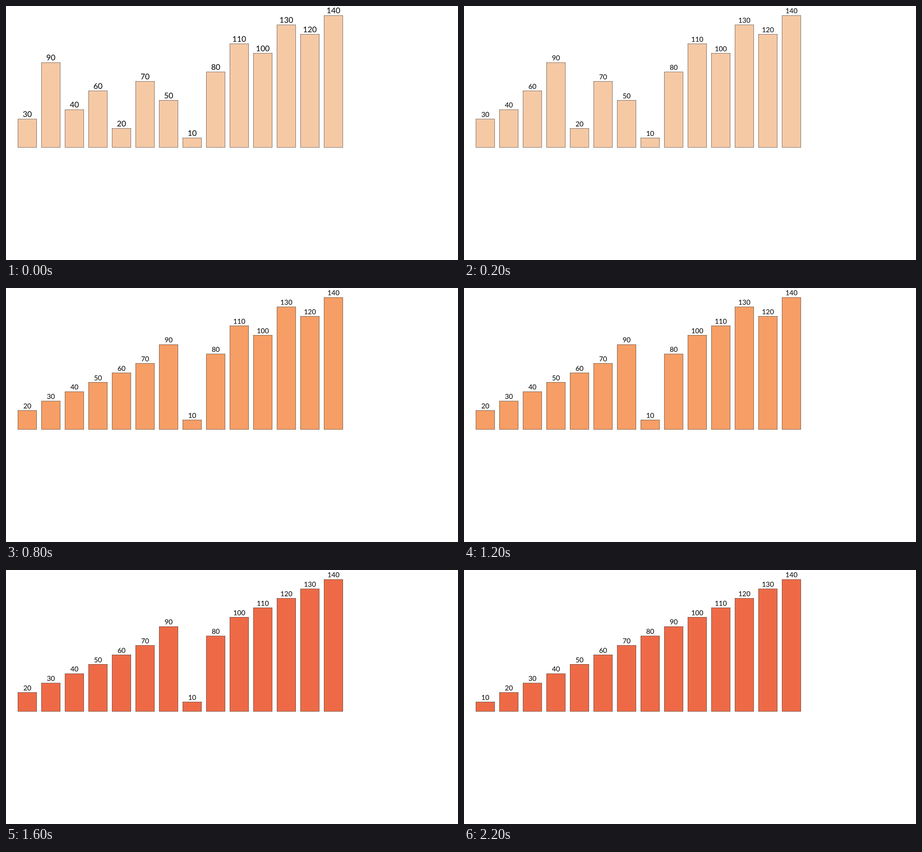
Animation, 998 px wide and 561 px high, one loop 2.4 s. Source, as an HTML page with a canvas:

```html
<!DOCTYPE html>
<html lang="en">
<head>
<meta charset="utf-8">
<title>Merge sort</title>
<style>
  html, body { margin: 0; width: 100%; height: 100%; overflow: hidden; background: #fff; }
  canvas { display: block; }
</style>
</head>
<body>
<canvas id="stage" width="998" height="561"></canvas>
<script>
const ctx = document.getElementById('stage').getContext('2d');
const TICK = 200, LEFT = 26.2, BASE = 312.2, PITCH = 52, BAR = 41.6, UNIT = 2.08;
const colors = ['#f6c9a5', '#f69e65', '#ee6a46'];
const values = [30, 90, 40, 60, 20, 70, 50, 10, 80, 110, 100, 130, 120, 140];

// Merge sort that yields the whole list after every merge
function* mergeSort(list, from = 0, to = list.length) {
  if (to - from < 2) return;
  const middle = Math.ceil((from + to) / 2);
  yield* mergeSort(list, from, middle);
  yield* mergeSort(list, middle, to);
  const merged = list.slice(from, to).sort((a, b) => a - b);
  list.splice(from, to - from, ...merged);
  yield [...list];
}

// The animation opens with the first two pairs already merged
const states = [...mergeSort(values)].slice(1);

function drawBar(value, i, color) {
  const x = LEFT + i * PITCH, height = value * UNIT, y = BASE - height;
  ctx.fillStyle = color;
  ctx.fillRect(x, y, BAR, height);
  ctx.strokeRect(x, y, BAR, height);
  ctx.fillStyle = '#000';
  ctx.fillText(value, x + BAR / 2, y - 4.6);
}

function draw(time) {
  const step = Math.floor(time / TICK) % states.length;
  const color = colors[Math.min(2, Math.floor((step + 1) / 4))];
  ctx.fillStyle = '#fff';
  ctx.fillRect(0, 0, 998, 561);
  ctx.font = `${step ? 15.3 : 17.4}px Lato, sans-serif`;
  ctx.textAlign = 'center';
  ctx.textRendering = 'geometricPrecision';
  ctx.lineWidth = 0.52;
  ctx.strokeStyle = '#000';
  states[step].forEach((value, i) => drawBar(value, i, color));
}

let begin;
function tick(now) {
  begin ??= now;
  draw(now - begin);
  requestAnimationFrame(tick);
}
requestAnimationFrame(tick);
</script>
</body>
</html>
```
